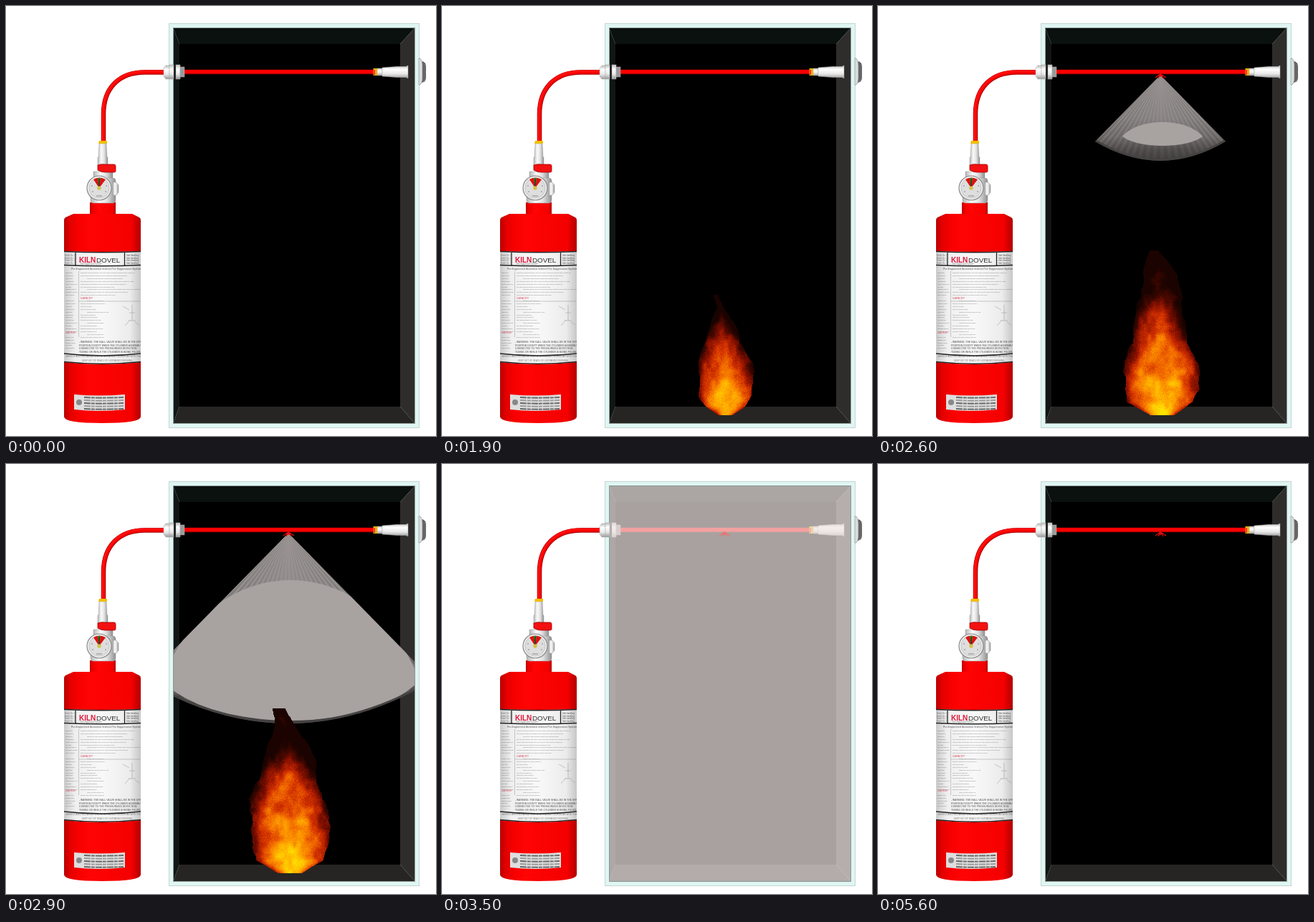
Animation, 600 px wide and 600 px high, one loop 6600 ms. Source, as an HTML page with a canvas:

```html
<!DOCTYPE html>
<html lang="en">
<head>
<meta charset="utf-8">
<title>Cabinet fire suppression</title>
<style>
html, body { margin: 0; width: 100%; height: 100%; overflow: hidden; background: #fff; }
svg { position: absolute; left: 0; top: 0; }
canvas { position: absolute; left: 330px; top: 320px; }
text { font-family: "Liberation Sans", Arial, sans-serif; fill: #333; }
</style>
</head>
<body>
<svg width="600" height="600" viewBox="0 0 600 600">
  <defs>
    <linearGradient id="red">
      <stop offset="0" stop-color="#b80000"/><stop offset=".08" stop-color="#e40000"/>
      <stop offset=".2" stop-color="#f80000"/><stop offset=".35" stop-color="#ff0404"/>
      <stop offset=".88" stop-color="#f40000"/><stop offset="1" stop-color="#b00000"/>
    </linearGradient>
    <linearGradient id="paper">
      <stop offset="0" stop-color="#cacaca"/><stop offset=".14" stop-color="#efefef"/>
      <stop offset=".5" stop-color="#f8f8f8"/><stop offset=".85" stop-color="#ececec"/>
      <stop offset="1" stop-color="#c4c4c4"/>
    </linearGradient>
    <linearGradient id="steelX">
      <stop offset="0" stop-color="#b4b4b4"/><stop offset=".35" stop-color="#fafafa"/>
      <stop offset=".65" stop-color="#e2e2e2"/><stop offset="1" stop-color="#909090"/>
    </linearGradient>
    <linearGradient id="steelY" x2="0" y2="1">
      <stop offset="0" stop-color="#bbb"/><stop offset=".3" stop-color="#fff"/>
      <stop offset=".65" stop-color="#e8e8e8"/><stop offset="1" stop-color="#999"/>
    </linearGradient>
    <linearGradient id="coneShade" x2="0" y2="1">
      <stop offset="0" stop-color="#9c9695"/><stop offset=".5" stop-color="#8c8786"/>
      <stop offset=".72" stop-color="#767171"/><stop offset=".86" stop-color="#524e4e"/>
      <stop offset="1" stop-color="#3e3b3b"/>
    </linearGradient>
    <pattern id="knurl" width="2" height="2" patternUnits="userSpaceOnUse">
      <rect width="2" height="2" fill="#bbb"/><path d="M0 0h1v1h1v1h-1v-1h-1z" fill="#111"/>
    </pattern>
    <clipPath id="inside"><rect x="234" y="31" width="336" height="551"/></clipPath>
    <clipPath id="coneClip"><path id="coneEdge"/></clipPath>
    <clipPath id="labelClip"><path d="M81 342Q134 344 188 342V497Q134 503 81 497Z"/></clipPath>
  </defs>

  <!-- cabinet -->
  <rect x="227" y="24" width="350" height="565" fill="#e0f6f3"/>
  <rect x="227.500" y="24.500" width="349" height="564" fill="none" stroke="#c3d6d4"/>
  <path d="M233 30H571L550 53H242Z" fill="#0b110f"/>
  <path d="M233 30L242 53V559L233 583Z" fill="#111614"/>
  <path d="M571 30L550 53V559L571 583Z" fill="#2e2d2b"/>
  <path d="M233 583L242 559H550L571 583Z" fill="#262523"/>
  <rect x="242" y="53" width="308" height="506"/>
  <rect x="233.500" y="30.500" width="337" height="552" fill="none" stroke="#8a9694"/>

  <!-- end knob -->
  <path d="M580 77Q586 78 586 84V100Q586 106 580 107Z" fill="url(#knurl)"/>
  <path d="M576 73H578Q581 76 581 83V101Q581 107 578 110H576Z" fill="#d9dedd" stroke="#888" stroke-width=".6"/>

  <!-- tube -->
  <g fill="none">
    <path d="M136 190V151C136 114 158 92.500 194 92.500H222M248 92H515" stroke="#a80000" stroke-width="6.500"/>
    <path d="M135.700 190V151C135.700 114 158 92 194 92H222M248 91.700H515" stroke="#f00" stroke-width="4.800"/>
    <path d="M134.700 188V151C135 114 158 91 194 91H221" stroke="#ff2c2c" stroke-width=".8"/>
  </g>
  <g stroke="#aaa" stroke-width=".5" fill="url(#steelY)">
    <path d="M220 87L223 83H228V102H223L220 98Z"/>
    <rect x="228" y="82" width="6" height="20"/>
    <rect x="237" y="82" width="6" height="20"/>
    <path d="M243 85H249V99H243Z" fill="#9a9a9a"/>
    <rect x="518" y="87" width="7" height="10"/>
    <path d="M525 86L545 84.500H558L561 83V101L558 99.500H545L525 98Z"/>
  </g>
  <rect x="512.500" y="87" width="5.500" height="10" fill="#e8b400"/>
  <rect x="513" y="89" width="2" height="7" fill="#f33"/>

  <!-- valve -->
  <path d="M117 274H153V294H117Z" fill="url(#red)"/>
  <g stroke="#999" stroke-width=".5" fill="url(#steelX)">
    <path d="M130 192H140L141 211H142V224H128V211H129Z"/>
    <rect x="122" y="231" width="27" height="13"/>
    <rect x="118" y="240" width="35" height="35" rx="4"/>
    <path d="M149 246H154L157 250V260L154 264H149Z"/>
  </g>
  <path d="M130 188H141V192H129Z" fill="#f0c000"/>
  <path d="M128 222Q134 220 138 221H151Q153 221 153 224V230Q153 232 151 232H138Q133 232 128 229Z" fill="#f31010" stroke="#a00000" stroke-width=".8"/>
  <circle cx="130" cy="254" r="17" fill="#e9e9e9" stroke="#8c8c8c" stroke-width="1.200"/>
  <circle cx="130" cy="254" r="14" fill="#dedede" stroke="#bbb" stroke-width=".7"/>
  <path d="M130 254L122 242Q130 237 139 242Z" fill="#e01010"/>
  <path d="M130 254L128 240H132Z" fill="#2b9a2b"/>
  <path d="M130 254V241" stroke="#111"/>
  <circle cx="130" cy="254" r="2.700" fill="#d3c343"/>
  <path d="M119 251h2M139 251h2M120 259h2M138 259h2M126 265h8" stroke="#888"/>

  <!-- cylinder -->
  <path d="M94 290H176L186 295Q188 296 188 299V573Q188 582 134 582Q81 582 81 573V299Q81 296 83 295Z" fill="url(#red)"/>
  <g clip-path="url(#labelClip)">
    <rect x="81" y="340" width="108" height="164" fill="url(#paper)"/>
    <g id="heading"></g>
    <g id="label" opacity=".62"></g>
  </g>
  <path d="M81 342.500Q134 345 188 342.500M81 361.500Q134 364 188 361.500M81 485Q134 491 188 485M81 496.500Q134 502 188 496.500M97 344V362M165.500 344V362" fill="none" stroke="#222" stroke-width="1.300"/>
  <path d="M95 542Q130 545 166 542V563Q130 567 95 563Z" fill="#dedede"/>
  <circle cx="102" cy="553" r="4" fill="#888"/>
  <g id="plate"></g>

  <!-- discharge -->
  <g clip-path="url(#inside)">
    <rect id="fog" x="233" y="30" width="338" height="553" fill="#f0e6e4"/>
    <g id="cone" clip-path="url(#coneClip)">
      <path id="coneBody" fill="url(#coneShade)"/>
      <g id="rays"></g>
      <path id="lens" fill="#a8a2a1"/>
      <path id="rim" fill="none" stroke="#454242" stroke-width="6"/>
    </g>
  </g>
  <path id="burst" d="M387 100L394 95L402 100M391 101L394 95L398 101M394 95V99" fill="none" stroke-width="1.300"/>
</svg>
<canvas id="fire" width="130" height="252"></canvas>

<script>
const LOOP = 6600, STEP = 100;
const AXIS = 394, APEX = 96, FLOOR = 571;
const FIRE_X = 330, FIRE_Y = 320;
const $ = id => document.getElementById(id);
const clamp = (v, lo = 0, hi = 1) => Math.min(hi, Math.max(lo, v));
const mix = (a, b, k) => a + (b - a) * k;

function add(parent, tag, attrs, text = "") {
  const el = document.createElementNS("http://www.w3.org/2000/svg", tag);
  for (const key in attrs) el.setAttribute(key, attrs[key]);
  el.textContent = text;
  parent.append(el);
  return el;
}

function write(x, y, size, text, extra = {}, parent = "label") {
  add($(parent), "text", { x, y, "font-size": size, ...extra }, text);
}

function buildLabel() {
  const bold = { "font-weight": "bold" };
  write(102, 357.5, 10, "KILN", { ...bold, style: "fill:#e2183c" }, "heading");
  write(126, 357.5, 9.8, "DOVEL", {}, "heading");
  write(104, 361, 2.6, "Fire Suppression Cylinder");
  for (let i = 0; i < 4; i++) {
    write(82, 349 + i * 3.6, 2.6, "Model No. 1");
    write(168, 349 + i * 3.6, 2.6, "Safe handling", bold);
  }
  write(91, 368, 3.4, "Pre-Engineered Automatic Indirect Fire Suppression System", bold);
  const words = "Read the manual before use and check pressure gauge each month for safe service".split(" ");
  const sentence = (start, count) =>
    Array.from({ length: count }, (_, k) => words[(start * 5 + k) % words.length]).join(" ");
  for (let i = 0; i < 28; i++) {
    const y = 373 + i * 3.9;
    if (i !== 9 && i !== 22) write(83, y, 2.4, sentence(i, 2));
    if (i < 24 && i !== 9) {
      const count = i < 9 ? 12 - i % 3 * 2 : 3 + i % 3;
      write(104 + (i % 4 === 2 ? 9 : 0), y, 2.4, sentence(i, count));
    }
  }
  const crimson = { ...bold, style: "fill:#d02038" };
  write(104, 409, 3.4, "CAPACITY", crimson);
  write(83, 457, 3, "CAUTION", crimson);
  ["- WARNING: THE BALL VALVE SHALL BE IN THE OFF",
   "POSITION EXCEPT WHEN THE CYLINDER ASSEMBLY IS",
   "CONNECTED TO THE PRESSURIZED DETECTION",
   "TUBING OR WHILE THE CYLINDER IS BEING FILLED."
  ].forEach((line, i) => write(102, 470 + i * 4.5, 3.4, line, bold));
  write(83, 490, 3.1, "SERVICE AND RECHARGE ONLY BY A TRAINED TECHNICIAN WITH THE MANUAL");
  write(106, 495.5, 3, "KEEP OUT OF REACH OF UNTRAINED PERSONS");
  add($("label"), "path", {
    d: "M101.500 370V462M102 412H187M163 419L172 424M176 417V439M172 428H180M171 439H181M166 446L173 438M180 441L186 445",
    fill: "none", stroke: "#888", "stroke-width": .7
  });
  for (let i = 0; i < 5; i++)
    add($("plate"), "path", {
      d: `M109 ${546 + i * 4}Q130 ${547.5 + i * 4} 164 ${546 + i * 4}`, fill: "none",
      stroke: i % 2 ? "#999" : "#666", "stroke-width": 1.8, "stroke-dasharray": "9 1 5 1"
    });
}

function buildRays() {
  const count = 44;
  for (let i = 0; i < count; i++) {
    const at = k => AXIS + mix(-660, 660, k / count);
    const side = Math.abs(i / count - .5) * 2;
    add($("rays"), "path", {
      d: `M${AXIS} ${APEX}L${at(i)} 756H${at(i + 1)}Z`,
      fill: i % 2 ? "#282525" : "#d0c8c6", opacity: i % 2 ? .03 + side * .15 : .04
    });
  }
}

function drawCone(time) {
  const visible = time >= 2400 && time < 3500;
  $("cone").style.display = visible ? "" : "none";
  if (!visible) return;
  const depth = 120 + (time - 2600) * .487;
  const half = depth * .76, edge = APEX + depth * .775, bottom = APEX + depth;
  const front = `${AXIS + half} ${edge}Q${AXIS} ${2 * bottom - edge} ${AXIS - half} ${edge}`;
  const body = `M${AXIS} ${APEX}L${front}Z`;
  $("coneBody").setAttribute("d", body);
  $("coneEdge").setAttribute("d", body);
  $("rim").setAttribute("d", `M${front}`);

  const p = (time - 2600) / 300;
  const center = AXIS + 3, reach = Math.max(0, 56 + 124 * p);
  const middle = 182 + 120 * p, top = 162, base = 195 + 163 * p;
  const left = center - reach, right = center + reach;
  const arc = (from, to, peak) => {
    const y = middle + (peak - middle) / .75;
    return `C${mix(from, to, .2)} ${y} ${mix(from, to, .8)} ${y} ${to} ${middle}`;
  };
  $("lens").setAttribute("d", p < 0 ? "" :
    `M${left} ${middle}${arc(left, right, top)}${arc(right, left, base)}Z`);
}

function fogAlpha(time) {
  if (time < 3100 || time >= 5600) return 0;
  if (time >= 5500) return .35;
  return .7 * clamp((time - 3000) / 500);
}

// Flame outlines: offsets from the axis at the heights in LEVELS.
const LEVELS = [0, .08, .16, .3, .45, .6, .75, .9, 1];
const OUTLINES = [
  { time: 1900, left: [-8, -28, -36, -35, -37, -29, -22, -10, -16], right: [10, 30, 38, 40, 38, 23, 16, -2, -10] },
  { time: 2600, left: [-14, -45, -49, -51, -40, -36, -29, -22, -16], right: [18, 44, 53, 53, 38, 30, 30, 18, -4] },
  { time: 2900, left: [-14, -44, -49, -52, -54, -40, -31, -20, -22], right: [18, 48, 54, 58, 49, 38, 33, 8, -4] }
];
const HEAT = [[26, 3, 0], [62, 6, 0], [135, 16, 0], [208, 46, 0], [244, 112, 0], [255, 172, 0], [255, 228, 0]];

function hash(x, y) {
  const v = Math.sin(x * 127.1 + y * 311.7) * 43758.5453;
  return v - Math.floor(v);
}

function noise(x, y) {
  const ix = Math.floor(x), iy = Math.floor(y);
  const ease = f => f * f * (3 - 2 * f);
  const fx = ease(x - ix), fy = ease(y - iy);
  return mix(mix(hash(ix, iy), hash(ix + 1, iy), fx),
             mix(hash(ix, iy + 1), hash(ix + 1, iy + 1), fx), fy);
}

function outlineAt(side, u, time) {
  const i = clamp(LEVELS.findIndex(v => v >= u), 1, 8);
  const k = (u - LEVELS[i - 1]) / (LEVELS[i] - LEVELS[i - 1]);
  const [a, b] = time < 2600 ? OUTLINES : OUTLINES.slice(1);
  const blend = clamp((time - a.time) / (b.time - a.time));
  const value = o => mix(o[side][i - 1], o[side][i], k);
  return mix(value(a), value(b), blend);
}

function heatColor(h) {
  const v = clamp(h) * 6, i = Math.min(5, Math.floor(v));
  return HEAT[i].map((c, n) => mix(c, HEAT[i + 1][n], v - i));
}

function drawFire(time) {
  const canvas = $("fire"), ctx = canvas.getContext("2d");
  const { width, height } = canvas, floor = FLOOR - FIRE_Y;
  ctx.clearRect(0, 0, width, height);
  if (time < 1000 || time >= 3400) return;
  const grow = clamp((time - 900) / 1000);
  const fade = clamp((3400 - time) / 400);
  const tall = (168 * grow + 62 * clamp((time - 1900) / 600)) * fade;
  const wide = (.35 + .65 * grow) * (.4 + .6 * fade);
  const image = ctx.createImageData(width, height);
  const drift = time * .09;
  for (let y = Math.floor(floor - tall); y < floor; y++) {
    const u = (floor - y) / tall;
    if (u > 1) continue;
    const left = outlineAt("left", u, time) * wide, right = outlineAt("right", u, time) * wide;
    const middle = (left + right) / 2, half = (right - left) / 2;
    const smoke = .32 * clamp((u - .62) * 6);
    for (let x = 0; x < width; x++) {
      const s = (x + FIRE_X - AXIS - middle) / half;
      if (Math.abs(s) > 1.25) continue;
      const coarse = noise(x / 17, (y + drift) / 21);
      const fine = noise(x / 6 + 40, (y + drift) / 8);
      const n = coarse * .6 + fine * .4 - .5;
      if (Math.abs(s) + n * (.12 + u * .2) > 1) continue;
      const grain = (hash(x, y + time) - .5) * .1;
      const heat = .95 - .72 * u - .5 * s * s - smoke + n * .36 + grain;
      image.data.set([...heatColor(heat), 255], (y * width + x) * 4);
    }
  }
  ctx.putImageData(image, 0, 0);
  canvas.style.opacity = fade;
}

let shown = -1;
function tick() {
  const time = Math.floor(performance.now() % LOOP / STEP) * STEP;
  if (time !== shown) {
    shown = time;
    drawCone(time);
    drawFire(time);
    const fog = fogAlpha(time), tint = 8 + fog * 150;
    $("fog").setAttribute("opacity", fog);
    $("burst").setAttribute("stroke", `rgb(236, ${tint}, ${tint})`);
    $("burst").style.display = time >= 2300 ? "" : "none";
  }
  requestAnimationFrame(tick);
}

buildLabel();
buildRays();
tick();
</script>
</body>
</html>
```
